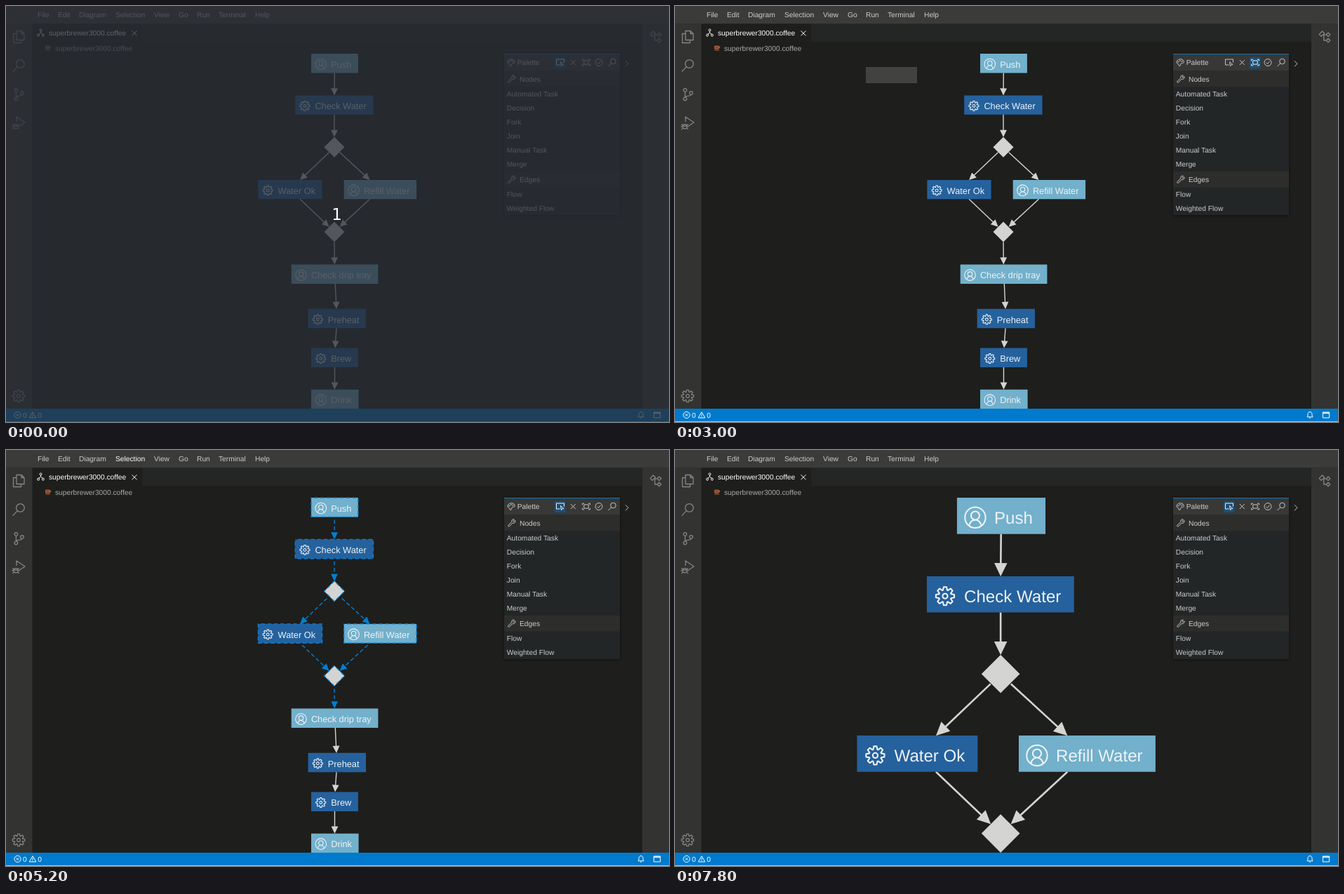
These frames come from a looping animation (945x593 px, 8 s). An HTML page:

```html
<!DOCTYPE html>
<html lang="en">
<head>
<meta charset="utf-8">
<title>Workflow editor</title>
<style>
  html, body { margin: 0; width: 100%; height: 100%; overflow: hidden; background: #1e1e1c; }
  svg { display: block; }
  text { font-family: "Liberation Sans", Arial, sans-serif; font-size: 10.24px; fill: #ccc; white-space: pre; }
  .ico { fill: none; stroke: #c5c5c5; stroke-width: 1; stroke-linejoin: round; }
  .bar { stroke: #858583; stroke-width: 1.3; }
  .white, .white text { fill: #fff; }
  .white .ico { stroke: #fff; }
  #diagram, #frame, #palette, #menu { text-rendering: geometricPrecision; }
  #diagram text { font-size: 12.78px; fill: #eef3f6; }
  .node-ico { fill: none; stroke: #eef3f6; stroke-width: 1.1; stroke-linejoin: round; }
  .manual { fill: #72b0cb; }
  .auto { fill: #25619d; }
  .gate { fill: #d4d4d2; }
  .edge { fill: none; stroke: #d4d4d2; stroke-width: 1.4; }
  .tip { fill: #d4d4d2; }
  .sel .edge, .sel .shape {
    stroke: #007fd4; stroke-width: 1.4; stroke-linecap: round; stroke-linejoin: round;
    stroke-dasharray: 4.56; stroke-dashoffset: 4.56;
  }
  .sel .tip { fill: #007fd4; }
</style>
</head>
<body>
<svg id="stage" width="945" height="593" viewBox="0 0 945 593">
  <defs>
    <clipPath id="canvas"><rect x="37" y="67.3" width="870" height="506.7"/></clipPath>
    <filter id="shadow" x="-10%" y="-10%" width="120%" height="120%">
      <feDropShadow dx="0" dy="1" stdDeviation="2.5" flood-color="#000" flood-opacity=".5"/>
    </filter>
  </defs>
  <rect width="945" height="593" fill="#1e1e1c"/>
  <g clip-path="url(#canvas)"><g id="diagram"></g></g>
  <rect id="marquee" x="272" y="87" fill="#fff" fill-opacity=".16"/>
  <g id="frame"></g>
  <g id="palette"></g>
  <g id="menu"></g>
  <g id="countdown">
    <rect width="945" height="593" fill="#282c34" fill-opacity=".75"/>
    <text x="471.5" y="305" text-anchor="middle" style="font:23px 'DejaVu Sans',sans-serif;fill:#fff">1</text>
  </g>
</svg>
<script>
const LOOP = 8000, STEP = 100;
const $ = id => document.getElementById(id);

const text = (x, y, s, extra = '') => `<text x="${x}" y="${y}" ${extra}>${s}</text>`;
const rect = (x, y, w, h, fill, extra = '') =>
  `<rect x="${x}" y="${y}" width="${w}" height="${h}" fill="${fill}" ${extra}/>`;
const icon = (x, y, d, cls = '', extra = '') =>
  `<path class="ico ${cls}" transform="translate(${x} ${y})" d="${d}" ${extra}/>`;
const ring = (x, y, r) => `M${x - r},${y}a${r},${r} 0 1 0 ${2 * r},0a${r},${r} 0 1 0 ${-2 * r},0`;

function gear(r) {
  const pts = [];
  for (let i = 0; i < 8; i++) {
    for (const [turn, k] of [[-.34, .68], [-.155, 1], [.155, 1], [.34, .68]]) {
      const a = i * Math.PI / 4 + turn;
      pts.push((r * k * Math.sin(a)).toFixed(2) + ',' + (-r * k * Math.cos(a)).toFixed(2));
    }
  }
  return `M${pts.join('L')}Z` + ring(0, 0, r * .27);
}

const ICONS = {
  user: ring(0, 0, 7.8) + ring(0, -1.5, 3.2) + 'M-4.6,6.2C-4,3.3 -2.2,1.8 0,1.8S4,3.3 4.6,6.2',
  gear: gear(7),
  cross: 'M-3.5,-3.5L3.5,3.5M3.5,-3.5L-3.5,3.5',
  chevron: 'M-2,-4L2,0L-2,4',
  lens: ring(1.5, -1.5, 3.8) + 'M-1.2,1.2L-5.5,5.5',
  wrench: 'M-5.2,3.6L-.2,-1.2C-1,-3.6 1,-5.6 3.4,-4.8L1.6,-2.8L2.8,-1.4L4.9,-3.3C5.7,-.8 3.4,1.2 1.1,.4L-3.8,5.2C-5,5.6 -5.8,4.6 -5.2,3.6Z',
  paint: 'M-1,5C-2.5,5 -1.4,2.6 -3,1.8C-6.4,1.6 -5.4,-4.6 .4,-4.8C5,-4.8 6,-.4 4.6,.6C3.4,1.2 1.4,.2 1,1.6C.8,3 .8,5 -1,5Z'
    + ring(-2.6, -1, .6) + ring(-.2, -2.6, .6) + ring(2.5, -1.7, .6),
  pick: 'M-.5,3.5H-5.5V-4.5H5.5V0M.5,-1L5,3L2.8,3.2L1.5,5.2Z',
  area: 'M-3.2,-2.6H3.2V2.6H-3.2ZM-5.5,-2.2V-4.3H-3M5.5,-2.2V-4.3H3M-5.5,2.2V4.3H-3M5.5,2.2V4.3H3',
  check: ring(0, 0, 5) + 'M-2.4,.2L-.6,2L2.6,-1.8',
  files: 'M-3,-8.5H4L8,-4.5V4.5H-3ZM4,-8.5V-4.5H8M-3,-4.5H-7.5V8.5H3.5V4.5',
  search: ring(2.4, -2.6, 5.8) + 'M-1.8,1.6L-8.3,8.6',
  branch: ring(-3.6, -6, 2.3) + ring(-3.6, 6.4, 2.3) + ring(5, -2, 2.3) + 'M-3.6,-3.7V4.1M5,.3C5,3.4 -3.6,1.4 -3.6,4.1',
  debug: 'M-3,-2V-9L9,-1L1,4.2' + ring(-4, 4.8, 3.2) + 'M-9,1.5L-6.6,3M-9.5,5H-7.2M-8.8,9L-6.5,7.2M1,1.5L-1.4,3M1.4,5.2H-.8M.8,9L-1.5,7.2M-7.2,4H-.8',
  outline: 'M-7.8,-3.6L-3.4,-8L-.4,-5L-4.8,-.6ZM2.2,-3.2L5,-6L7.8,-3.2L5,-.4ZM2.2,5L5,2.2L7.8,5L5,7.8ZM-2,-3.2H2.2M-1.2,-3.2V5H2.2',
  tree: ring(0, -3.6, 1.5) + ring(-3.4, 3.6, 1.5) + ring(3.4, 3.6, 1.5) + 'M0,-2.1V0L-2.8,2.3M0,0L2.8,2.3',
  cup: 'M-3.5,-3H2V1.2H-3.5ZM2,-2.2H3.6V0H2M-3.5,3H3',
  error: ring(0, 0, 4.6) + 'M-1.8,-1.8L1.8,1.8M1.8,-1.8L-1.8,1.8',
  warn: 'M0,-4.2L4.8,4H-4.8ZM0,-1.5V1.4M0,2.3V3.2',
  bell: 'M-4,2.8H4L3,1V-1.2C3,-5.4 -3,-5.4 -3,-1.2V1ZM-1,4.2H1',
  pane: 'M-4.6,-4H4.6V4H-4.6ZM-4.6,-3H4.6M-4.6,-2.3H4.6'
};

/* Diagram: boxes are [x, y, width, kind, label], gates are [cx, cy]. */
const BOX_H = 27.4, GATE_R = 14.5;
const BOXES = [
  [435, 68, 66.9, 'manual', 'Push'],
  [412.2, 127.4, 111.3, 'auto', 'Check Water'],
  [359.4, 247.9, 91.2, 'auto', 'Water Ok'],
  [481.7, 247.9, 103.4, 'manual', 'Refill Water'],
  [406.7, 368.6, 123.7, 'manual', 'Check drip tray'],
  [430.6, 431.8, 82.4, 'auto', 'Preheat'],
  [435, 487.5, 66.9, 'auto', 'Brew'],
  [435, 546.7, 67.6, 'manual', 'Drink']
];
const GATES = [[468, 201.3], [468, 321.9]];
const EDGES = [
  [468.3, 95.4, 468, 127.6], [468, 154.8, 468, 187],
  [460.4, 208.8, 419.1, 248], [475.8, 208.8, 518.5, 248],
  [419.1, 275.3, 460.6, 314.8], [518.5, 275.3, 475.7, 314.8],
  [468, 336.4, 468.3, 368.6], [469.3, 396, 471, 432],
  [471, 459.2, 469, 487.6], [468.5, 514.9, 468.5, 546.8]
];

function drawDiagram(hit) {
  const group = (x1, y1, x2, y2, body) =>
    `<g class="${hit(Math.min(x1, x2), y1, Math.max(x1, x2), y2) ? 'sel' : ''}">${body}</g>`;
  const edges = EDGES.map(([x1, y1, x2, y2]) => {
    const a = Math.atan2(y2 - y1, x2 - x1), ex = x2 - 8 * Math.cos(a), ey = y2 - 8 * Math.sin(a);
    return group(x1, y1, x2, y2, `<path class="edge" d="M${x1},${y1}L${ex},${ey}"/>
      <path class="tip" transform="translate(${x2} ${y2}) rotate(${a * 180 / Math.PI})" d="M0,0L-10.2,-4.9V4.9Z"/>`);
  });
  const boxes = BOXES.map(([x, y, w, kind, label]) => group(x, y, x + w, y + BOX_H,
    `<path class="shape ${kind}" d="M${x},${y}h${w}v${BOX_H}h${-w}Z"/>
     <path class="node-ico" transform="translate(${x + 13.8} ${y + 15})" d="${ICONS[kind === 'auto' ? 'gear' : 'user']}"/>`
    + text(x + 28.2, y + 19.7, label)));
  const r = GATE_R;
  const gates = GATES.map(([x, y]) => group(x - r, y - r, x + r, y + r,
    `<path class="shape gate" d="M${x},${y - r}l${r},${r}l${-r},${r}l${-r},${-r}Z"/>`));
  return edges.concat(boxes, gates).join('');
}

const MENU_BAR = [[45, 'File'], [74, 'Edit'], [104, 'Diagram'], [156, 'Selection'], [211, 'View'],
  [246, 'Go'], [272, 'Run'], [303, 'Terminal'], [355, 'Help']];

function drawFrame(hover, open) {
  return rect(0, 0, 945, 25.5, '#3b3b39')
    + (open ? rect(99, 5, 49, 16, '#484846') : '')
    + MENU_BAR.map(([x, s]) => text(x, 16, s, s === hover ? 'style="fill:#fff"' : '')).join('')
    + rect(0, 25.5, 37.5, 548.5, '#333331') + rect(907, 25.5, 38, 548.5, '#333331')
    + rect(37.5, 25.5, 869.5, 25.5, '#242625') + rect(38, 25.5, 156, 25.5, '#1e1e1c')
    + ['files', 'search', 'branch', 'debug'].map((n, i) => icon(18, 44 + 41 * i, ICONS[n], 'bar')).join('')
    + icon(18, 556, gear(8.8), 'bar') + icon(926, 44, ICONS.outline, 'bar')
    + `<g class="white">${icon(49.5, 38, ICONS.tree)}${text(61, 41.5, 'superbrewer3000.coffee')}${icon(183, 38.8, ICONS.cross)}</g>`
    + icon(60, 60, ICONS.cup, '', 'style="stroke:#a1623f;fill:#8a4a2a"')
    + text(70, 63.6, 'superbrewer3000.coffee', 'style="fill:#a9a9a9"')
    + rect(0, 574, 945, 18, '#007acc') + rect(0, 592, 945, 1, '#b5c9d4')
    + `<g class="white">${icon(16.5, 583, ICONS.error)}${text(24, 586.8, '0')}${icon(38, 583, ICONS.warn)}${text(45.3, 586.8, '0')}
       ${icon(905, 583, ICONS.bell)}${icon(928, 583, ICONS.pane)}</g>`;
}

const TOOLS = [[790, 'pick'], [808.3, 'cross'], [827, 'area'], [845, 'check'], [864, 'lens']];
const ITEMS = [[125.3, 'Automated Task'], [145.3, 'Decision'], [165.5, 'Fork'], [185.5, 'Join'],
  [205.5, 'Manual Task'], [225.7, 'Merge'], [268.2, 'Flow'], [288.2, 'Weighted Flow']];

function drawPalette(active, hoverTool, hoverItem) {
  return rect(710, 68, 165, 230, '#242625', 'filter="url(#shadow)"')
    + rect(710, 68, 165, 24.5, '#383836') + rect(710, 68, 165, 1, '#0d78bd')
    + icon(720, 80.5, ICONS.paint) + text(728.7, 84, 'Palette')
    + TOOLS.map(([x, n]) => (n === active ? rect(x - 8, 73, 15.7, 16, '#1d4f75') : '')
      + icon(x, 80.5, ICONS[n], '', n === active || n === hoverTool ? 'style="stroke:#f0f4f8"' : '')).join('')
    + [[92.5, 'Nodes'], [235.8, 'Edges']].map(([y, s]) => rect(710, y, 165, 22.8, '#2d2d2c')
      + icon(721, y + 11.3, ICONS.wrench) + text(732, y + 15.2, s)).join('')
    + ITEMS.map(([y, s]) => text(713.8, y + 3.7, s)
      + (s === hoverItem ? rect(710.5, y - 10, 164, 20, 'none', 'stroke="#0a6cae"') : '')).join('')
    + icon(885, 82.3, ICONS.chevron);
}

const MENU = [['Align'], ['Center', 'Alt+C'], ['Export', 'Alt+E'], ['Fit to screen', 'Alt+F'],
  ['Layout', 'Alt+L'], ['Resize'], ['Select all', 'Ctrl+A']];

function drawMenu(active) {
  return rect(98.5, 21.5, 161, 138.5, '#242625', 'stroke="#474745" rx="2" filter="url(#shadow)"')
    + MENU.map(([s, key], i) => {
      const y = 33 + 19 * i, style = i === active ? 'style="fill:#fff"' : '';
      return (i === active ? rect(102, y - 9.5, 154, 19, '#04395e') : '') + text(125, y + 3.7, s, style)
        + (key ? text(236, y + 3.7, key, 'text-anchor="end" ' + style) : icon(242, y, ICONS.chevron));
    }).join('');
}

/* Lower right corner of the rubber band, one entry per step from 2900 ms. */
const BAND_START = 2900, BAND_END = 4300;
const BAND = [[290, 90], [345, 110], [430, 142], [535, 184], [615.5, 226], [642, 266], [657, 301],
  [669, 326], [676, 337], [679.5, 337]];

function bandAt(t) {
  if (t < BAND_START) return null;
  return BAND[Math.min(BAND.length - 1, Math.floor((t - BAND_START) / STEP))];
}

function zoomAt(t) {
  const p = Math.max(0, Math.min(1, (t - 6250) / 300));
  const e = p < .5 ? 2 * p * p : 1 - 2 * (1 - p) * (1 - p);
  return `translate(37 68) scale(${Math.pow(1.885, e)}) translate(${-37 - 204.4 * e} -68)`;
}

function put(id, html) {
  const el = $(id);
  if (el.last !== html) el.innerHTML = el.last = html;
}

function render(t) {
  const between = (a, b) => t >= a && t < b;
  const band = bandAt(t), open = between(5500, 6300);
  const hit = (x1, y1, x2, y2) => band && t < 7800 && x2 > 272 && x1 < band[0] && y2 > 87 && y1 < band[1];
  put('diagram', drawDiagram(hit));
  $('diagram').setAttribute('transform', zoomAt(t));

  const dragging = between(BAND_START, BAND_END);
  $('marquee').setAttribute('width', dragging ? band[0] - 272 : 0);
  $('marquee').setAttribute('height', dragging ? band[1] - 87 : 0);

  put('frame', drawFrame(between(5200, 5300) ? 'Selection' : between(5300, 5500) ? 'Diagram' : '', open));
  put('palette', drawPalette(between(1400, BAND_END) ? 'area' : 'pick',
    between(900, 1400) ? 'area' : '', between(6600, 7800) ? 'Manual Task' : ''));
  put('menu', open ? drawMenu(t < 5700 ? -1 : Math.min(3, Math.floor((t - 5700) / STEP))) : '');
  $('countdown').style.display = t < 100 ? '' : 'none';
}

const start = performance.now();
function tick() {
  const t = (performance.now() - start) % LOOP;
  render(Math.floor(t / STEP) * STEP);
  requestAnimationFrame(tick);
}
tick();
</script>
</body>
</html>
```
